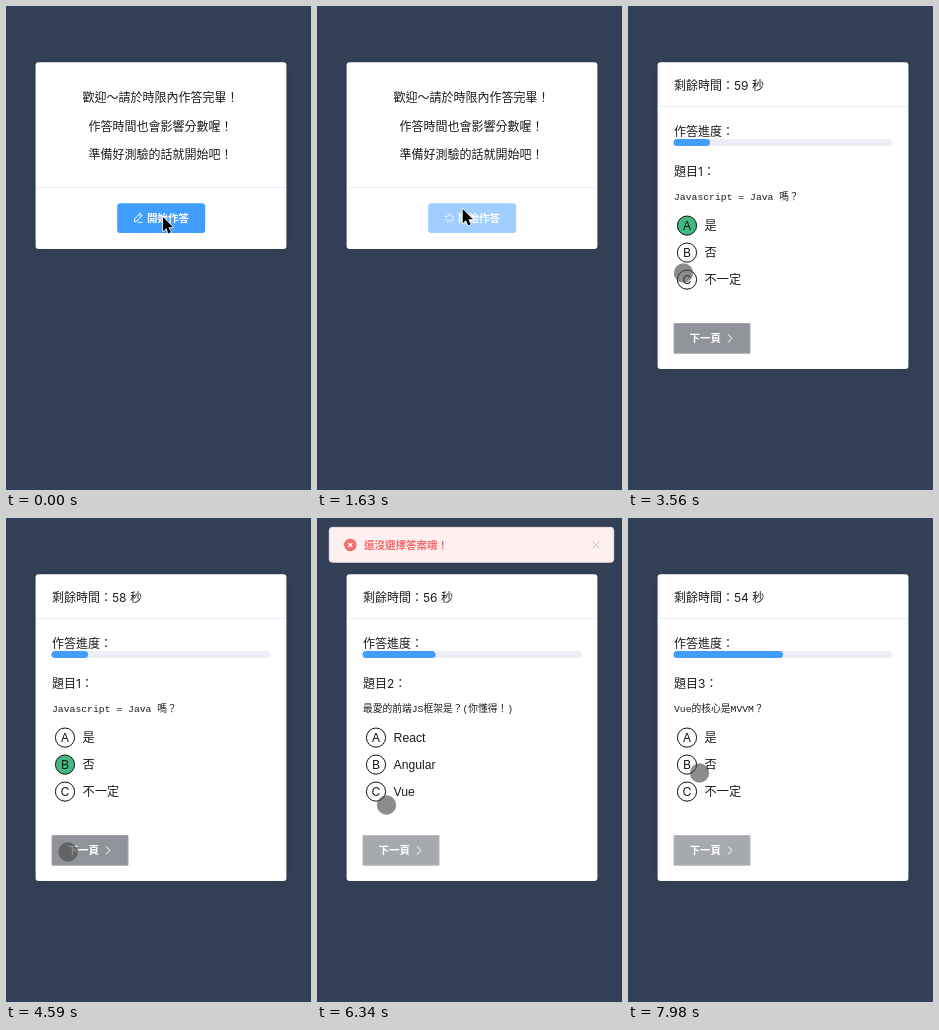
An HTML page with a canvas for the animation above (8000 ms loop, 305x484 px).

```html
<!DOCTYPE html>
<html lang="zh-Hant">
<head>
<meta charset="utf-8">
<title>Quiz</title>
<style>
  html, body { margin: 0; width: 100%; height: 100%; overflow: hidden; background: #324157; }
  canvas { display: block; width: 305px; height: 484px; }
</style>
</head>
<body>
<canvas id="stage"></canvas>
<script>
const W = 305, H = 484, LOOP = 8000, STEP = 147.75, LEAD = 14;
const CJK = '"Noto Sans CJK TC", "Noto Sans CJK JP", sans-serif';
const SANS = '"Inter", ' + CJK;
const ARIAL = '"Liberation Sans", ' + CJK;
const MONO = '"Liberation Mono", ' + CJK;
const BLUE = '#409eff', INK = '#1c1c1c', RED = '#f56c6c';

const canvas = document.getElementById('stage');
const c = canvas.getContext('2d');
const dpr = window.devicePixelRatio || 1;
canvas.width = W * dpr;
canvas.height = H * dpr;

const questions = [
  { text: 'Javascript = Java 嗎？', options: ['是', '否', '不一定'] },
  { text: '最愛的前端JS框架是？(你懂得！)', options: ['React', 'Angular', 'Vue'] },
  { text: 'Vue的核心是MVVM？', options: ['是', '否', '不一定'] }
];

// Places where the pointer rests or turns, in ticks
const stops = [
  { from: 0, to: 4, x: 157, y: 211 },
  { from: 11, to: 14, x: 145.7, y: 203 },
  { from: 18, to: 19, x: 62, y: 221 },
  { from: 22, to: 23, x: 63, y: 333 },
  { from: 24, to: 24, x: 55.5, y: 267 },
  { from: 26, to: 27, x: 53, y: 249 },
  { from: 31, to: 32, x: 62, y: 334 },
  { from: 35, to: 37, x: 70.5, y: 275 },
  { from: 39, to: 40, x: 64, y: 335 },
  { from: 43, to: 43, x: 69.5, y: 287 },
  { from: 45, to: 45, x: 61, y: 275 },
  { from: 47, to: 47, x: 61.6, y: 291 },
  { from: 49, to: 51, x: 64, y: 343 },
  { from: 54, to: 55, x: 71.5, y: 255 }
];

const START_CLICK = 5, QUIZ = 12, NEXT = [32, 51];
const picks = [
  { at: 18, option: 0 }, { at: 27, option: 1 }, { at: NEXT[0], option: -1 },
  { at: 45, option: 2 }, { at: NEXT[1], option: -1 }
];
const MSG_IN = 5715, MSG_OUT = 6755;

const tickTime = n => n * STEP - LEAD;
const clamp = v => Math.max(0, Math.min(1, v));
const mix = (a, b, k) => a + (b - a) * k;

// cubic-bezier(.25, .1, .25, 1)
function ease(x) {
  x = clamp(x);
  if (x === 0 || x === 1) return x;
  const curve = (a, b, u) => 3 * a * u * (1 - u) ** 2 + 3 * b * u * u * (1 - u) + u ** 3;
  let lo = 0, hi = 1;
  for (let i = 0; i < 24; i++) {
    const mid = (lo + hi) / 2;
    if (curve(.25, .25, mid) < x) lo = mid; else hi = mid;
  }
  return curve(.1, 1, lo);
}

function pointerAt(n) {
  const i = stops.findLastIndex(s => s.from <= n);
  const a = stops[i], b = stops[i + 1] || a;
  const k = n > a.to ? (n - a.to) / (b.from - a.to) : 0;
  return [mix(a.x, b.x, k), mix(a.y, b.y, k)];
}

function text(str, x, midY, size, { font = SANS, color = INK, weight = 400, align = 'left' } = {}) {
  c.font = `${weight} ${size}px ${font}`;
  c.fillStyle = color;
  c.textAlign = align;
  c.fillText(str, x, midY + size * .37);
}

function box(x, y, w, h, r, fill, stroke) {
  c.beginPath();
  c.roundRect(x, y, w, h, r);
  c.fillStyle = fill;
  c.fill();
  if (stroke) {
    c.strokeStyle = stroke;
    c.lineWidth = 1;
    c.stroke();
  }
}

function lines(color, width, ...paths) {
  c.strokeStyle = color;
  c.lineWidth = width;
  c.beginPath();
  for (const p of paths)
    for (let i = 0; i < p.length; i += 2) c[i ? 'lineTo' : 'moveTo'](p[i], p[i + 1]);
  c.stroke();
}

function disc(x, y, r, fill, stroke) {
  c.beginPath();
  c.arc(x, y, r, 0, Math.PI * 2);
  c.fillStyle = fill;
  c.fill();
  if (stroke) { c.strokeStyle = stroke; c.lineWidth = 1; c.stroke(); }
}

function cross(x, y, r, color, width) {
  lines(color, width, [x - r, y - r, x + r, y + r], [x + r, y - r, x - r, y + r]);
}

function card(bottom, rule) {
  c.save();
  c.shadowColor = 'rgba(0,0,0,.1)';
  c.shadowBlur = 9 * dpr;
  c.shadowOffsetY = 1.5 * dpr;
  box(29.6, 56.2, 250.8, bottom - 56.2, 3, '#fff');
  c.restore();
  lines('#ebeef5', 1, [30, rule, 280, rule]);
}

function spinner(x, y, angle) {
  c.save();
  c.translate(x, y);
  c.rotate(angle);
  for (let i = 0; i < 8; i++) {
    lines('#fff', 1, [0, -2.5, 0, -4.7]);
    c.rotate(Math.PI / 4);
  }
  c.restore();
}

function pencil(x, y) {
  lines('#fff', .9, [x, y + 4.3, x + 5, y + 4.3]);
  c.save();
  c.translate(x, y);
  c.rotate(.73);
  lines('#fff', .9, [-1.5, 2.8, -1.5, -5, 1.5, -5, 1.5, 2.8, 0, 5, -1.5, 2.8], [-1.5, -3.4, 1.5, -3.4]);
  c.restore();
}

function welcome(n) {
  card(243, 181.5);
  ['歡迎～請於時限內作答完畢！', '作答時間也會影響分數喔！', '準備好測驗的話就開始吧！']
    .forEach((s, i) => text(s, 154.6, 91.8 + i * 28.5, 12, { align: 'center' }));
  const busy = n >= START_CLICK;
  box(111.2, 197.2, 88, 29.9, 3, busy ? '#a0cfff' : BLUE);
  if (busy) spinner(132.5, 212, (n - START_CLICK) * STEP / 2000 * Math.PI * 2);
  else pencil(131.7, 212);
  text('開始作答', 141, 212.5, 10.5, { color: '#fff', weight: 700 });
}

function quiz(n) {
  const t = tickTime(n);
  const page = NEXT.filter(k => n >= k).length;
  const q = questions[page];
  const last = picks.findLast(p => n >= p.at);
  const picked = last ? last.option : -1;

  card(363, 100.5);
  const left = 60 - Math.floor((t + 20 - tickTime(QUIZ)) / 1000);
  text(`剩餘時間：${left} 秒`, 46, 79.5, 12);

  text('作答進度：', 46, 125.2, 12);
  let done = 1;
  for (const k of NEXT) done += ease((t - tickTime(k) + 60) / 500);
  box(45.5, 133, 219, 7, 3.5, '#ebeef5');
  box(45.5, 133, 219 * done / 6, 7, 3.5, BLUE);

  text(`題目${page + 1}：`, 46, 165.5, 12);
  text(q.text, 46, 190, 9.75, { font: MONO });
  q.options.forEach((label, i) => {
    const y = 219.6 + i * 27;
    disc(59, y, 9.6, picked === i ? '#42b983' : '#fff', '#111');
    text('ABC'[i], 59, y + .2, 12.3, { align: 'center' });
    text(label, 76.6, y + .3, 12.2, { font: ARIAL });
  });

  const focused = page > 0 && picked < 0;
  box(46, 317.5, 76, 29.7, 0, focused ? '#a6a9ad' : '#909399', focused ? '#b4b7ba' : '#a3a5aa');
  text('下一頁', 61.5, 332.5, 10.5, { color: '#fff', weight: 700 });
  lines('#fff', 1, [100, 328.3, 103.8, 332.4, 100, 336.5]);
}

function message(n) {
  const t = tickTime(n);
  if (t < MSG_IN || t > MSG_OUT + 400) return;
  const shown = d => ease((t - MSG_IN) / d) - ease((t - MSG_OUT) / d);
  c.save();
  c.globalAlpha = clamp(shown(300));
  c.translate(0, -35.5 * (1 - shown(400)));
  box(12.3, 9.4, 284.4, 34.8, 3, '#fef0f0', '#fde2e2');
  disc(33.3, 27, 6.2, RED);
  cross(33.3, 27, 2, '#fff', 1.2);
  text('還沒選擇答案哦！', 47, 27.4, 10.5, { color: RED, weight: 700 });
  cross(278.8, 27, 3.5, '#c0c4cc', 1);
  c.restore();
}

function arrow(x, y) {
  c.save();
  c.translate(x, y);
  c.scale(.92, .92);
  const shape = new Path2D('M0 0V15.5L3.6 12.2L6 17.8L8.6 16.7L6.2 11.2H11Z');
  c.lineJoin = 'round';
  c.lineWidth = 1.6;
  c.strokeStyle = '#fff';
  c.stroke(shape);
  c.fillStyle = '#000';
  c.fill(shape);
  c.restore();
}

function draw(now) {
  const n = Math.floor((now % LOOP + LEAD) / STEP);
  c.setTransform(dpr, 0, 0, dpr, 0, 0);
  c.fillStyle = '#324157';
  c.fillRect(0, 0, W, H);
  const [x, y] = pointerAt(n);
  if (n < QUIZ) {
    welcome(n);
    arrow(x, y);
  } else {
    quiz(n);
    message(n);
    disc(x, y, 9.7, 'rgba(70,70,70,.62)');
  }
}

let start;
function frame(now) {
  if (start === undefined) start = now;
  draw(now - start);
  requestAnimationFrame(frame);
}
draw(0);
requestAnimationFrame(frame);
</script>
</body>
</html>
```
